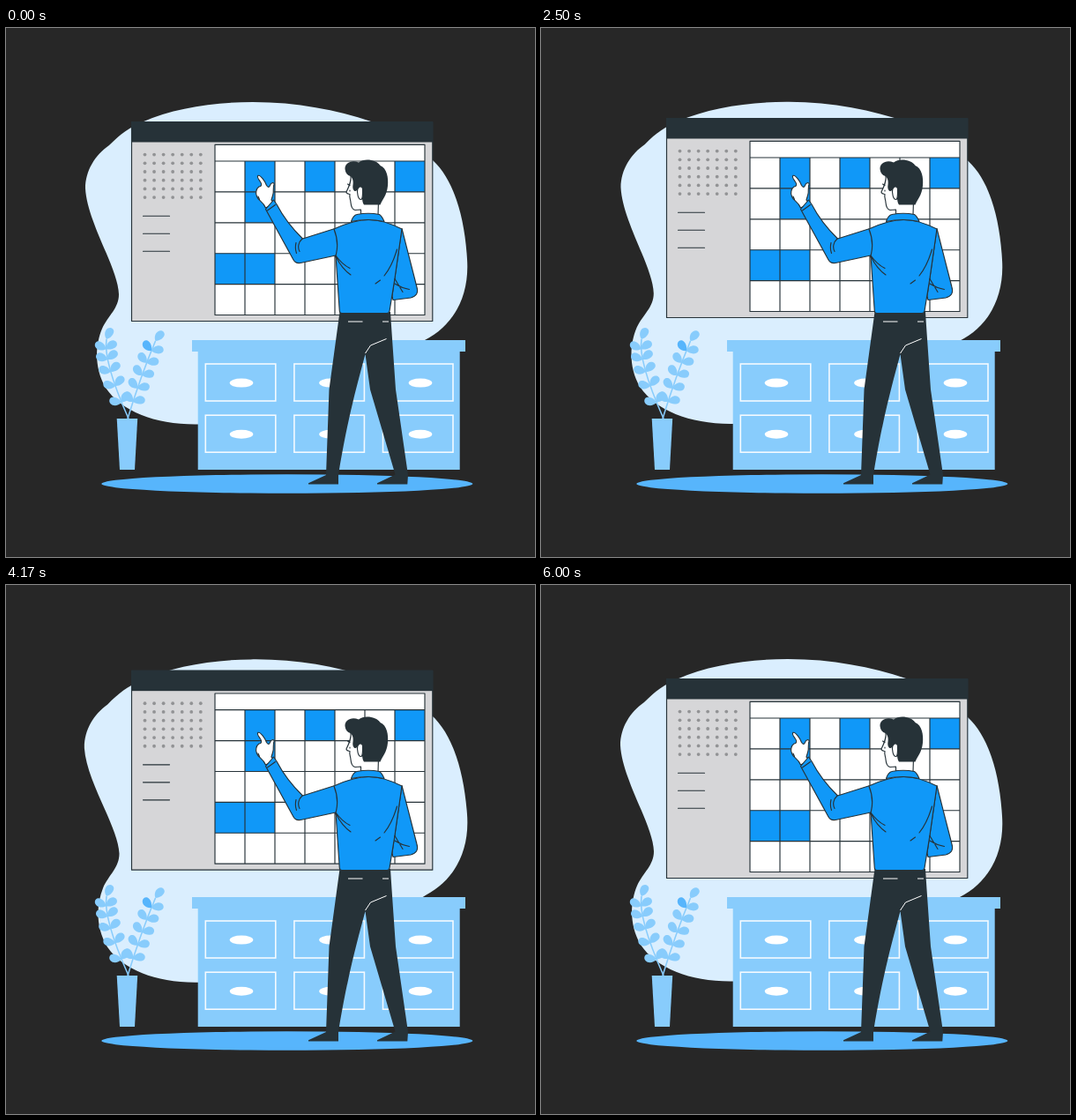
Recreate the animation shown at these times as an HTML page. Size 600 by 600 pixels, loop 6.04 s.

```html
<!DOCTYPE html>
<html lang="en">
<head>
<meta charset="utf-8">
<title>Planning board</title>
<style>
  html, body { margin: 0; width: 100%; height: 100%; overflow: hidden; background: #272727; }
  svg { display: block; width: 100vw; height: 100vh; }
  .ink { fill: #263238; }
  .blue { fill: #1098f8; }
  .soft { fill: #88ccfc; }
  .mid { fill: #57b5fc; }
  .white { fill: #fff; }
  .line { stroke: #263238; stroke-width: 1.15; stroke-linecap: round; stroke-linejoin: round; }
  .bare { fill: none; }
  .trim { fill: none; stroke: #f4faff; stroke-width: 1.6; }
  .stem { fill: none; stroke: #88ccfc; stroke-width: 1.6; }
</style>
</head>
<body>
<svg viewBox="0 0 600 600">
  <path id="blob" fill="#daeefe" d="M280 84C330 84 375 93 414 106C445 117 466 132 484 150C507 171 520 212 523 262C526 305 507 338 475 354C400 400 330 448 217 449.500C170 450 131 435 113 408C100 386 101 360 109 341C116 326 128 318 128 302C127 272 92 220 90 182C90 162 101 144 117 133C130 120 140 113 155 106.500C190 91 235 84 280 84Z"/>

  <g id="board">
    <rect class="line" x="142.500" y="106.500" width="341.300" height="226" fill="#d6d6d8"/>
    <rect class="ink" x="142" y="106.300" width="342.300" height="23.200"/>
    <g id="dots" fill="#929395"></g>
    <path class="line" d="M155.500 213.200H185.500M155.500 233.200H185.500M155.500 253.200H185.500"/>
    <rect class="white" x="237" y="132.300" width="238" height="193.200"/>
    <g id="cells" class="blue"></g>
    <path id="grid" class="line bare"/>
  </g>

  <ellipse class="mid" cx="318.800" cy="517" rx="210.500" ry="10.800"/>
  <path class="soft" d="M211 354H521V367H514.700V501H217.700V367H211Z"/>
  <g id="drawers"></g>
  <g id="plant"></g>
  <path class="soft" d="M125.700 443H149.200L146 501H129Z"/>

  <g id="man">
    <path class="ink" d="M378.500 322H436L437.500 345L442 410L456 507L455.300 517.500H421V516.300L441.500 506.500L413 410L407.500 370C399 402 388 440 377 507L377 517.500H343V516.300L363 507L366.500 410Z"/>
    <path class="bare" stroke="#fff" d="M388 333H404.500M427 333H434M407.500 369L413.500 360L431.500 352.500"/>

    <path class="white line" d="M294.500 204C292 197 286 196 284.500 191C282.500 187 284 182 287 180C290 180 290.500 177 288.500 174.500C286.500 171.500 284 169 286 167.300C288.500 166.500 294 174 295.500 178.500C297 181 298.500 181 299.500 178.500C300.500 175.500 303.500 174.500 304.200 177C302 181 304.500 185 302.500 190L301 195L304.500 199Z"/>
    <path class="line bare" d="M286 191L287.500 194.500"/>

    <path class="blue line" d="M449 227.500L466 294C468 301 465 304.500 459 306L439 308.500L438 304L441 283Z"/>
    <path class="blue line" d="M303.500 195L307 200Q318 221 336.500 239L373 227.500C383 223 396 217.500 412 217.500C426 217.500 437 222 449 228L441 284L435 321Q434.500 323.500 432 323.500H381Q378.500 323.500 378.300 321L374 258L334 266.500Q328 267.500 325.500 262L294.500 205.500Z"/>
    <path class="line bare" d="M296.500 207L305.500 200.500M372 228C376 238 377 249 373.500 260M374 258Q381 268 390 272.500M374.500 260Q381 273 391 280M443.500 251Q438 270 429 281M419 290L424.500 286M336 239C331.500 243 330.500 249 333 253.500M329 243.500Q327.500 250 329.500 255.500M441 284.500L450 299.500M441 290Q449 295 457.500 296.500"/>

    <path class="white line" d="M391 167C392 174 389 180 386 186C386 188 388 188 390 188.500C389 192 391 195 391 198C391.500 203 393 206 396 206.500L402.500 206V212H422L422.500 196L415 165Z"/>
    <path class="ink" d="M384.500 160C384 153 392 149 400 152.500C406 147.500 420 149 424.500 156C432 159 434 170 433 179C432 190 427 194 424.500 200.500H406C403.500 197 404.500 191 402.500 187C400 187 400.500 183 398 184C395.500 187 392.500 183 393.500 178C394.500 172 392 169 390.500 168C387 167 385 164.500 384.500 160Z"/>
    <path class="white line" d="M404.500 182C402 177.500 398 181 398.500 186C399 191 400 195 403 194.500C405 193 404.500 187 404.500 182Z"/>
    <path class="line bare" d="M387.500 177L390 178.500M390 184V185"/>
    <path class="blue line" d="M391.500 219.500C393 215 395 212 398 211.500Q411 209 423.500 211.500C426 213 427.500 216 429 219.500Q410 215.500 391.500 219.500Z"/>
  </g>
</svg>
<script>
  const $ = id => document.getElementById(id);
  const range = n => [...Array(n).keys()];

  function add(parent, tag, attrs) {
    const el = document.createElementNS('http://www.w3.org/2000/svg', tag);
    for (const key in attrs) el.setAttribute(key, attrs[key]);
    parent.append(el);
  }

  // Wall calendar: seven columns, five rows
  const CELL_W = 34, CELL_H = 34.9;
  const colX = c => 237 + c * CELL_W;
  const rowY = r => 151 + r * CELL_H;

  $('grid').setAttribute('d',
    'M237 132.3H475V325.5H237Z' +
    range(5).map(r => `M237 ${rowY(r)}H475`).join('') +
    range(6).map(c => `M${colX(c + 1)} 151V325.5`).join(''));

  for (const day of [1, 3, 6, 8, 21, 22]) {
    add($('cells'), 'rect', {
      x: colX(day % 7), y: rowY(Math.floor(day / 7)), width: CELL_W, height: CELL_H
    });
  }

  for (const i of range(42)) {
    add($('dots'), 'circle', {
      cx: 157.5 + (i % 7) * 10.55, cy: 143.6 + Math.floor(i / 7) * 9.7, r: 1.9
    });
  }

  // Cabinet: three by two drawers
  for (const i of range(6)) {
    const c = i % 3, y = i < 3 ? 381 : 439.2;
    add($('drawers'), 'rect', { x: 226.3 + c * 100.6, y, width: 79.5, height: 42, class: 'trim' });
    add($('drawers'), 'ellipse', { cx: 267 + c * 101.5, cy: y + 21.6, rx: 13.3, ry: 5, class: 'white' });
  }

  // Plant: paired leaves along a quadratic stem, one more at its tip
  function leaf(x, y, turn, tone = 'soft') {
    add($('plant'), 'path', {
      d: 'M0 0C3-5 9-6 12-3.500C14.500-1.500 14.500 2 12 3.700C9 5.500 3 4 0 0Z',
      class: tone,
      transform: `translate(${x} ${y}) rotate(${turn})`
    });
  }

  function sprig([x0, y0], [x1, y1], [x2, y2], first, topTone) {
    const at = (a, b, c, t) => (1 - t) ** 2 * a + 2 * t * (1 - t) * b + t * t * c;
    const slope = (a, b, c, t) => (1 - t) * (b - a) + t * (c - b);
    const point = t => [at(x0, x1, x2, t), at(y0, y1, y2, t)];
    const angle = t => Math.atan2(slope(y0, y1, y2, t), slope(x0, x1, x2, t)) * 180 / Math.PI;

    add($('plant'), 'path', { d: `M${x0} ${y0}Q${x1} ${y1} ${x2} ${y2}`, class: 'stem' });
    for (const i of range(5)) {
      const t = first + i * 0.165;
      leaf(...point(t), angle(t) - 60, i === 4 ? topTone : 'soft');
      leaf(...point(t), angle(t) + 60);
    }
    leaf(x2, y2, angle(1) + 15);
  }

  sprig([139, 443], [110, 378], [114, 353], 0.15, 'soft');
  sprig([138, 443], [153, 394], [169.5, 355], 0.2, 'mid');

  // Motion: the board floats, the backdrop sways, both linear at 24 steps a second
  const LOOP = 6040, STEP = 1000 / 24, LAST = 144;

  const float = t => {
    const p = (t % 3000) / 1500;
    return -12 * (p < 1 ? p : 2 - p);
  };

  const sway = t => {
    const p = (t % 6000) / 1500;
    return p < 1 ? p : p < 3 ? 2 - p : p - 4;
  };

  const start = performance.now();
  function draw() {
    const now = (performance.now() - start) % LOOP;
    const t = Math.min(LAST, Math.floor((now + 5) / STEP)) * STEP;
    $('board').setAttribute('transform', `translate(0 ${float(t).toFixed(3)})`);
    $('blob').setAttribute('transform', `rotate(${sway(t).toFixed(4)} 307 267)`);
    requestAnimationFrame(draw);
  }
  draw();
</script>
</body>
</html>
```
